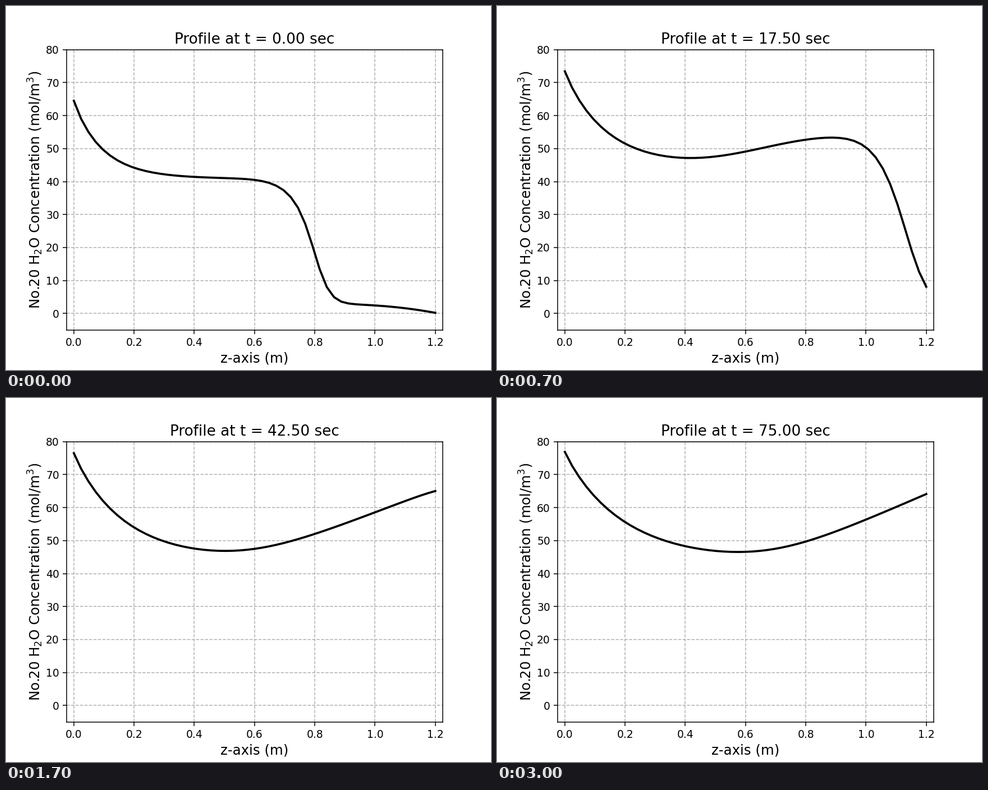
These frames come from a looping animation (864 px wide and 648 px high, 3.1 s). A matplotlib script:

```python
import numpy as np
import matplotlib.pyplot as plt
from matplotlib.animation import FuncAnimation

FRAMES, INTERVAL = 31, 100
CELLS, DZ, DT = 50, 0.024, 2.5

plt.rcParams["font.family"] = "DejaVu Sans"

z = np.arange(CELLS + 1) * DZ


def ramp(x, width=0.1):
    """Zero for negative x, x for positive x, with a rounded corner."""
    return width * np.logaddexp(0, x / width)


def behind_front(t):
    """Decay from the inlet, then a climb towards the outlet."""
    startup = np.exp(-t / 3)
    base = 43.9 - 0.009 * t - 3 * startup
    inlet = 76.9 - 4.1 * np.exp(-(t / 32) ** 3) - 8.3 * startup
    depth = 0.121 + 0.0014 * t - 4.7e-6 * t * t - 0.023 * startup
    decay = (inlet - base) * np.exp(-(z / depth) ** 0.95)

    slope = 30 + 0.14 * t
    onset = 0.455 + 0.0031 * t - 0.22 * np.exp(-(t / 15) ** 3)
    reach = 0.125 * (t / 12.5) ** 3
    climb = slope * (ramp(z - onset) - ramp(z - onset - reach))
    return base + decay + climb


def ahead_of_front(t):
    dip = 2.5 * np.exp(-t / 5) * (np.clip(z - 0.9, 0, None) / 0.3) ** 2
    return max(2.7 - 0.08 * t, 0) - dip


def profile(t):
    """A lopsided sigmoid front travels along the column and leaves it."""
    s = z - (0.788 + 0.0353 * t ** 0.785)
    steepness = 20.5 + 10.5 * np.exp(-t / 11)
    skew = 4 + 4 * np.cos(t / 4)
    share = 1 / (1 + np.exp(s * (steepness + skew * np.tanh(s / 0.09))))
    low = ahead_of_front(t)
    return low + (behind_front(t) - low) * share


fig, ax = plt.subplots(figsize=(6.4, 4.8), dpi=135)
line, = ax.plot(z, profile(0), color="black", linewidth=2)
ax.set_xlim(-DZ, 1.2 + DZ)
ax.set_ylim(-5, 80)
ax.grid(linestyle="--")
ax.set_xlabel("z-axis (m)", fontsize=13, labelpad=3.5)
ax.set_ylabel("No.20 H$_2$O Concentration (mol/m$^3$)", fontsize=13,
              labelpad=1.6)
title = ax.set_title("", fontsize=14)


def update(n):
    t = n * DT
    line.set_ydata(profile(t))
    title.set_text(f"Profile at t = {t:.2f} sec")
    return line, title


anim = FuncAnimation(fig, update, frames=FRAMES, interval=INTERVAL,
                     repeat=True, repeat_delay=0)
plt.show()
```
